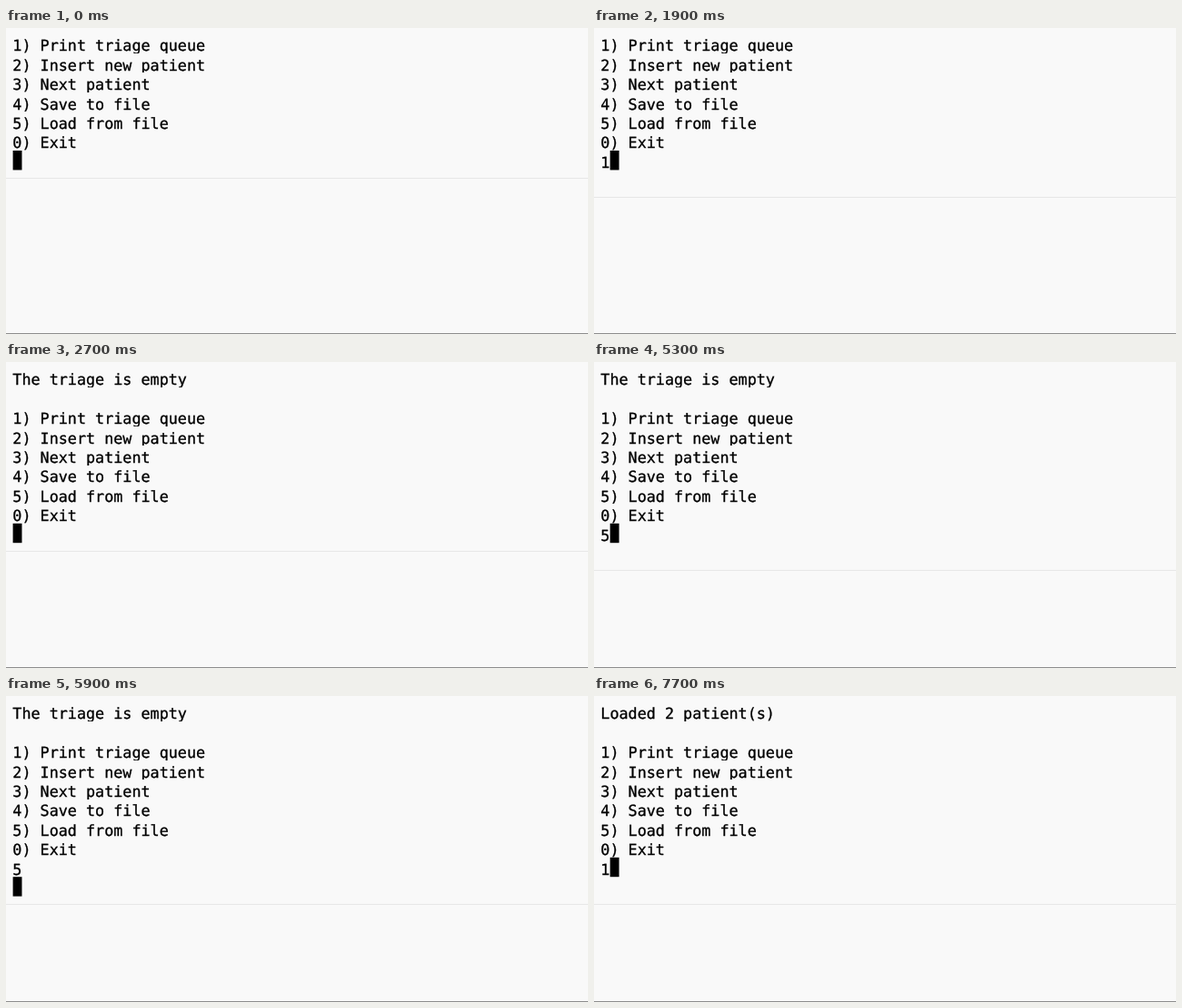
Recreate the animation shown at these times as an HTML page with a canvas. Size 640x337 px, loop 8 s.

```html
<!DOCTYPE html>
<html lang="en">
<head>
<meta charset="utf-8">
<title>Triage menu</title>
<style>
  html, body { margin: 0; height: 100%; overflow: hidden; background: #f9f9f9; }
  canvas { display: block; }
</style>
</head>
<body>
<canvas id="stage" width="640" height="337"></canvas>
<script>
const ctx = document.getElementById('stage').getContext('2d');
const LOOP = 8000, LEFT = 7.3, TOP = 6.6, ROW = 21.4, CELL = 10.08;

const menu = ['1) Print triage queue', '2) Insert new patient', '3) Next patient',
  '4) Save to file', '5) Load from file', '0) Exit'];
const empty = ['The triage is empty', '', ...menu];
const loaded = ['Loaded 2 patient(s)', '', ...menu];

// at: start time, lines: screen text, cursor: [column, row], rule: y of the divider
const states = [
  { at: 0,    lines: [...menu, ''],    cursor: [0, 6], rule: 165 },
  { at: 1800, lines: [...menu, '1'],   cursor: [1, 6], rule: 186 },
  { at: 2700, lines: [...empty, ''],   cursor: [0, 8], rule: 208 },
  { at: 5200, lines: [],               cursor: null,   rule: 229 },
  { at: 5300, lines: [...empty, '5'],  cursor: [1, 8], rule: 229 },
  { at: 5900, lines: [...empty, '5'],  cursor: [0, 9], rule: 229 },
  { at: 6300, lines: [...loaded, ''],  cursor: [0, 8], rule: 229 },
  { at: 7700, lines: [...loaded, '1'], cursor: [1, 8], rule: 229 },
];

function rect(color, x, y, w, h) {
  ctx.fillStyle = color;
  ctx.fillRect(x, y, w, h);
}

// Each row is clipped to its own cell height, which cuts the descenders.
function drawLine(text, row) {
  const y = TOP + row * ROW, top = Math.round(y);
  const baseline = Math.round(y + 18.8);
  ctx.save();
  ctx.beginPath();
  ctx.rect(0, top, 640, Math.round(y + ROW) - top);
  ctx.clip();
  ctx.fillStyle = ctx.strokeStyle = '#000';
  ctx.lineWidth = 0.3;
  ctx.fillText(text, LEFT, baseline);
  ctx.strokeText(text, LEFT, baseline);
  ctx.restore();
}

function draw(time) {
  const { lines, cursor, rule } = states.findLast(s => s.at <= time);
  rect('#f9f9f9', 0, 0, 640, 337);
  rect('#e7e7e7', 0, rule, 640, 1);
  rect('#8c8c8c', 0, 336, 640, 1);
  ctx.font = '16.75px "DejaVu Sans Mono", monospace';
  ctx.textRendering = 'geometricPrecision';
  lines.forEach(drawLine);
  if (cursor) {
    const [col, row] = cursor;
    rect('#000', 7.6 + col * CELL, TOP + row * ROW, CELL - 0.2, ROW);
  }
}

function tick() {
  draw(performance.now() % LOOP);
  requestAnimationFrame(tick);
}
tick();
</script>
</body>
</html>
```
